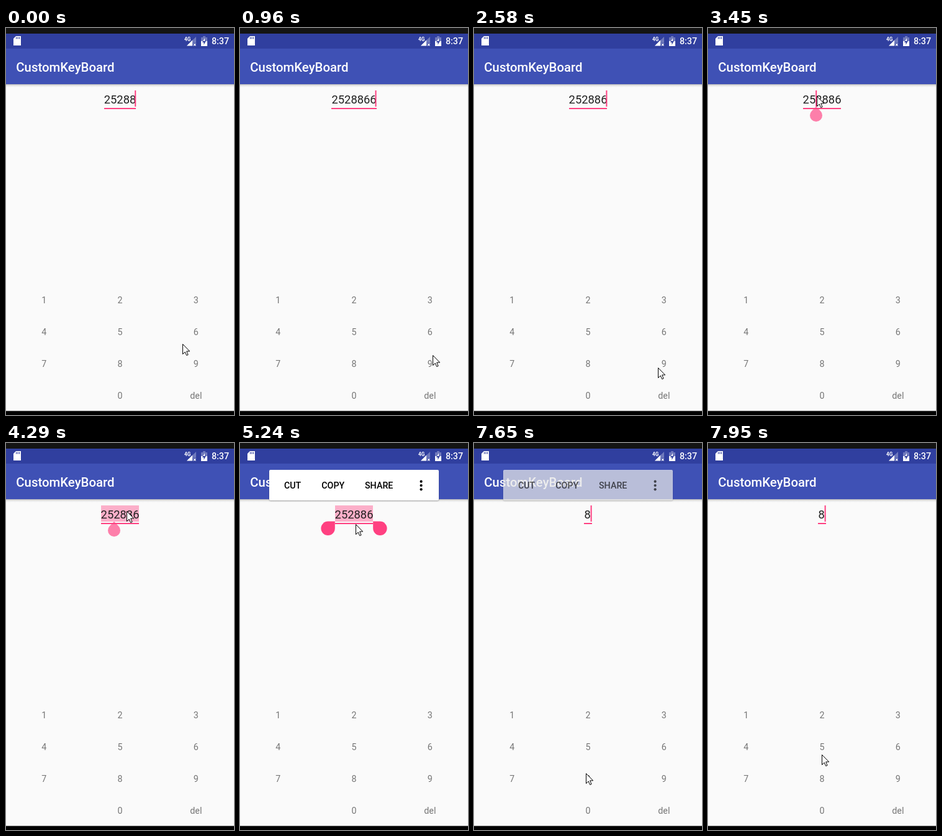
An HTML page with a canvas for the animation above (8 s loop, 367 by 620 pixels).

```html
<!DOCTYPE html>
<html lang="en">
<head>
<meta charset="utf-8">
<title>Custom keyboard</title>
<style>
html, body { margin: 0; width: 100%; height: 100%; overflow: hidden; background: #fafafa; }
canvas { display: block; width: 367px; height: 620px; }
</style>
</head>
<body>
<canvas id="stage"></canvas>
<script>
const W = 367, H = 620, LOOP = 8000;
const DP = W / 360;          // the phone screen is 360 units wide
const STEP = 135;            // ms between two refreshes of the screen
const DIGIT = 10.3;
const ACCENT = '#ff4081', BAR = '#3f51b5', STATUS = '#303f9f';
const FAINT = 'rgba(255,255,255,.3)';

const canvas = document.getElementById('stage');
const ctx = canvas.getContext('2d');
const ratio = window.devicePixelRatio || 1;
canvas.width = W * ratio;
canvas.height = H * ratio;

const HOME = { x: 284, y: 506 };
const moves = [
  { start: 270, steps: 4, x: 306, y: 491 },
  { start: 820, steps: 4, x: 313, y: 557 },
  { start: 1370, steps: 5, x: 310, y: 594 },
  { start: 2460, steps: 5, x: 175, y: 109 },
  { start: 3880, steps: 3, x: 194, y: 109 },
  { start: 4680, steps: 2, x: 200, y: 114 },
  { start: 5240, steps: 1, x: 186, y: 130 },
  { start: 5390, steps: 7, x: 59, y: 519, bend: -0.15 },
  { start: 6290, steps: 4, x: 248, y: 585, bend: 0.2 },
  { start: 6840, steps: 4, x: 173, y: 534, bend: 1.6 },
  { start: 7370, steps: 1, x: 180, y: 529 },
  { start: 7790, steps: 2, x: 183, y: 499 }
];

const TAP = 3450, SELECT = 4290, GRIPS = 4410, MENU = 4540, REPLACE = 7650;
const presses = [
  { time: 550, key: '6' }, { time: 690, key: '6' }, { time: 1100, key: '9' },
  { time: 2180, key: 'del' }, { time: 2460, key: 'del' }, { time: REPLACE, key: '8' }
];

const stepsSince = (t, start) => Math.max(0, Math.floor((t - start) / STEP) + 1);
const smooth = u => u * u * (3 - 2 * u);
const isSelected = t => t >= SELECT && t < REPLACE;

// Two refreshes to appear, two to vanish.
function fade(t, start, end) {
  return Math.max(0, Math.min(1, 0.66 * stepsSince(t, start), 0.66 * (2 - stepsSince(t, end))));
}

function pointerAt(t) {
  let from = HOME;
  for (const to of moves) {
    const u = smooth(Math.min(1, stepsSince(t, to.start) / to.steps));
    if (u < 1) return u ? along(from, to, u) : from;
    from = to;
  }
  return from;
}

// Quadratic curve whose control point is pushed sideways from the middle.
function along(a, b, u) {
  const dx = b.x - a.x, dy = b.y - a.y, bend = b.bend || 0;
  const side = 2 * u * (1 - u) * bend;
  return { x: a.x + dx * u - dy * side, y: a.y + dy * u + dx * side };
}

function textAt(t) {
  let text = '25288';
  for (const { time, key } of presses) {
    if (time > t) break;
    if (key === 'del') text = text.slice(0, -1);
    else text = (time === REPLACE ? '' : text) + key;
  }
  return text;
}

function caretOn(t) {
  const times = [0, TAP, ...presses.map(p => p.time)];
  const last = Math.max(...times.filter(time => time <= t));
  return !isSelected(t) && (t - last) % 1000 < 500;
}

function rect(x, y, w, h, color) {
  ctx.fillStyle = color;
  ctx.fillRect(x, y, w, h);
}

function poly(points, color) {
  ctx.beginPath();
  points.forEach(([x, y]) => ctx.lineTo(x, y));
  ctx.closePath();
  ctx.fillStyle = color;
  ctx.fill();
}

function label(text, x, y, sp, color, weight = 400, align = 'left') {
  ctx.font = `${weight} ${sp * DP}px Roboto, sans-serif`;
  ctx.textAlign = align;
  ctx.fillStyle = color;
  ctx.fillText(text, x, y);
}

function withAlpha(alpha, draw) {
  if (!alpha) return;
  ctx.save();
  ctx.globalAlpha = alpha;
  draw();
  ctx.restore();
}

function statusBar() {
  rect(0, 0, W, 9, '#141414');
  rect(0, 9, W, 24, STATUS);

  // memory card
  poly([[16, 13], [24, 13], [24, 28], [12, 28], [12, 17]], '#fff');
  for (let i = 0; i < 3; i++) rect(16 + i * 2.5, 14.5, 1.2, 3, STATUS);

  // mobile signal
  label('4G', 287, 20.5, 8, '#fff', 700);
  poly([[306, 14], [306, 24], [301, 24], [301, 28.5], [291, 28.5]], FAINT);
  poly([[300, 19.6], [300, 28.5], [291, 28.5]], '#fff');
  ctx.strokeStyle = '#fff';
  ctx.lineWidth = 1.1;
  ctx.beginPath();
  ctx.moveTo(302, 25); ctx.lineTo(305.5, 28.5);
  ctx.moveTo(305.5, 25); ctx.lineTo(302, 28.5);
  ctx.stroke();

  // battery
  rect(317, 13, 4, 2, FAINT);
  rect(314, 15, 10, 6, FAINT);
  rect(314, 21, 10, 8, '#fff');
  poly([[320, 16], [316, 23], [318.4, 23], [318.4, 27], [322, 20.5], [320, 20.5]], STATUS);
  poly([[320, 16], [317.2, 21], [320, 21]], '#fff');

  label('8:37', 359, 26.4, 14, '#fff', 500, 'right');
}

function appBar() {
  const shade = ctx.createLinearGradient(0, 90, 0, 95);
  shade.addColorStop(0, 'rgba(0,0,0,.28)');
  shade.addColorStop(0.4, 'rgba(0,0,0,.09)');
  shade.addColorStop(1, 'rgba(0,0,0,0)');
  rect(0, 90, W, 5, shade);
  rect(0, 33, W, 57, BAR);
  label('CustomKeyBoard', 16 * DP, 69.8, 20, '#fff', 500);
}

function keypad() {
  [...'123456789', '', '0', 'del'].forEach((key, i) => {
    const x = W * (i % 3 * 2 + 1) / 6;
    const y = 440.6 + Math.floor(i / 3) * 51;
    label(key, x, y, 14, '#757575', 400, 'center');
  });
}

function field(t) {
  const text = textAt(t);
  const width = Math.max(12 * DP, text.length * DIGIT);
  const left = (W - width) / 2, right = left + width;
  const edge = Math.round(left), span = Math.round(right) - edge;

  if (isSelected(t)) rect(edge, 100, span, 26, 'rgba(255,64,129,.4)');
  label(text, left, 120.7, 18, '#212121');
  rect(edge, 128, span, 2, ACCENT);

  if (caretOn(t)) {
    const place = t >= TAP && t < SELECT ? 2 : text.length;
    rect(Math.min(left + place * DIGIT, right - 2), 100, 2, 26, ACCENT);
  }
  withAlpha(fade(t, TAP, SELECT), () => handle(174, 140, 10, -Math.PI / 4));
  if (isSelected(t)) withAlpha(fade(t, GRIPS, REPLACE), () => {
    handle(left - 11, 136.8, 11.2, 0);
    handle(right + 11, 136.8, 11.2, -Math.PI / 2);
  });
}

// A disc with one square corner, at the top right when turn is zero.
function handle(x, y, r, turn) {
  ctx.save();
  ctx.translate(x, y);
  ctx.rotate(turn);
  ctx.beginPath();
  ctx.arc(0, 0, r, 0, Math.PI * 1.5);
  ctx.lineTo(r, -r);
  ctx.closePath();
  ctx.fillStyle = ACCENT;
  ctx.fill();
  ctx.restore();
}

function menu() {
  ctx.save();
  ctx.shadowColor = 'rgba(0,0,0,.3)';
  ctx.shadowBlur = 2 * ratio;
  ctx.shadowOffsetY = ratio;
  ctx.beginPath();
  ctx.roundRect(47, 43, 273, 49, 2);
  ctx.fillStyle = '#fff';
  ctx.fill();
  ctx.restore();

  const item = (text, x) => label(text, x, 73.4, 14, '#000', 500);
  item('CUT', 71);
  item('COPY', 131.3);
  item('SHARE', 201);
  for (let i = -1; i <= 1; i++) {
    ctx.beginPath();
    ctx.arc(291.6, 68 + i * 6.3, 2.1, 0, Math.PI * 2);
    ctx.fill();
  }
}

function arrow({ x, y }) {
  ctx.save();
  ctx.translate(Math.round(x) + 0.5, Math.round(y) + 0.5);
  poly([[0, 0], [0, 16], [3.7, 12.5], [6.2, 18], [8.6, 17], [6.2, 11.4], [11.2, 11.4]], '#fff');
  ctx.strokeStyle = '#000';
  ctx.lineWidth = 1;
  ctx.stroke();
  ctx.restore();
}

function draw(t) {
  ctx.setTransform(ratio, 0, 0, ratio, 0, 0);
  rect(0, 0, W, H, '#fafafa');
  statusBar();
  appBar();
  keypad();
  field(t);
  withAlpha(fade(t, MENU, REPLACE), menu);
  rect(0, 613.5, W, H - 613.5, '#000');
  arrow(pointerAt(t));
}

const start = performance.now();
function tick() {
  draw((performance.now() - start) % LOOP);
  requestAnimationFrame(tick);
}
tick();
</script>
</body>
</html>
```
